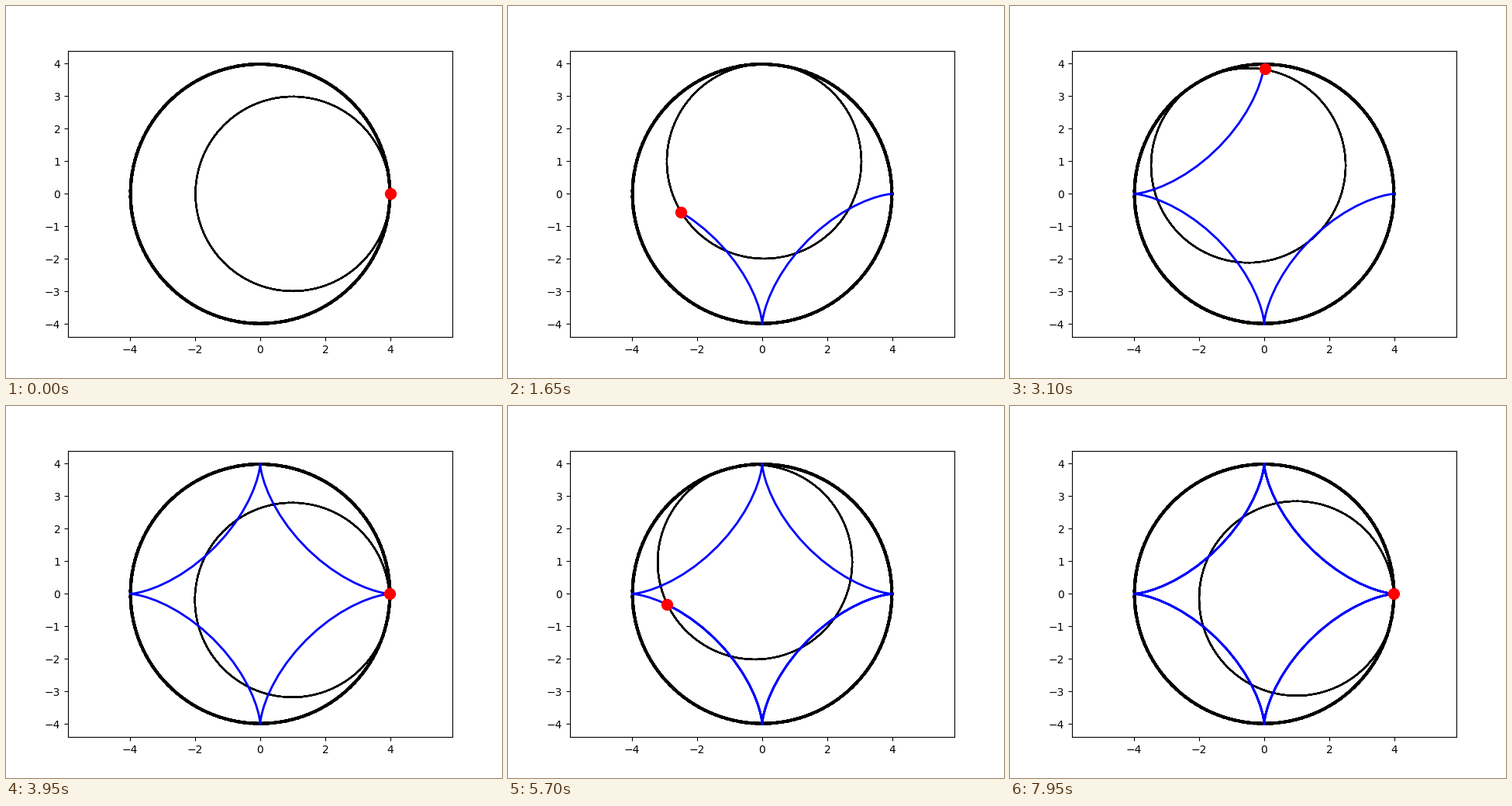
Write a matplotlib script that moves like this. It is 640 px wide and 480 px high and loops after 8 s.

```python
import numpy as np
import matplotlib.pyplot as plt
from matplotlib.animation import FuncAnimation

R, r = 4, 3            # fixed and rolling circle radii
FRAMES, INTERVAL = 160, 50

# 15 turns in coarse steps; the overlapping chords give the circles their texture
theta = np.linspace(0, 30 * np.pi, 400)
cos_t, sin_t = np.cos(theta), np.sin(theta)

# rolling circle's centre and the hypocycloid traced by its marked point
cx, cy = (R - r) * cos_t, (R - r) * sin_t
spin = (R - r) / r * theta
px, py = cx + r * np.cos(spin), cy - r * np.sin(spin)

fig, ax = plt.subplots(figsize=(6.4, 4.8), dpi=100)
ax.plot(R * cos_t, R * sin_t, "k", lw=2)
roller, = ax.plot(cx[0] + r * cos_t, cy[0] + r * sin_t, "k", lw=1)
trail, = ax.plot([], [], "b", lw=2)
dot, = ax.plot(px[:1], py[:1], "ro", ms=10)
ax.axis("equal")


def update(i):
    roller.set_data(cx[i] + r * cos_t, cy[i] + r * sin_t)
    trail.set_data(px[:i + 1], py[:i + 1])
    dot.set_data(px[i:i + 1], py[i:i + 1])
    return roller, trail, dot


anim = FuncAnimation(fig, update, frames=FRAMES, interval=INTERVAL,
                     repeat=True, repeat_delay=0)
plt.show()
```
